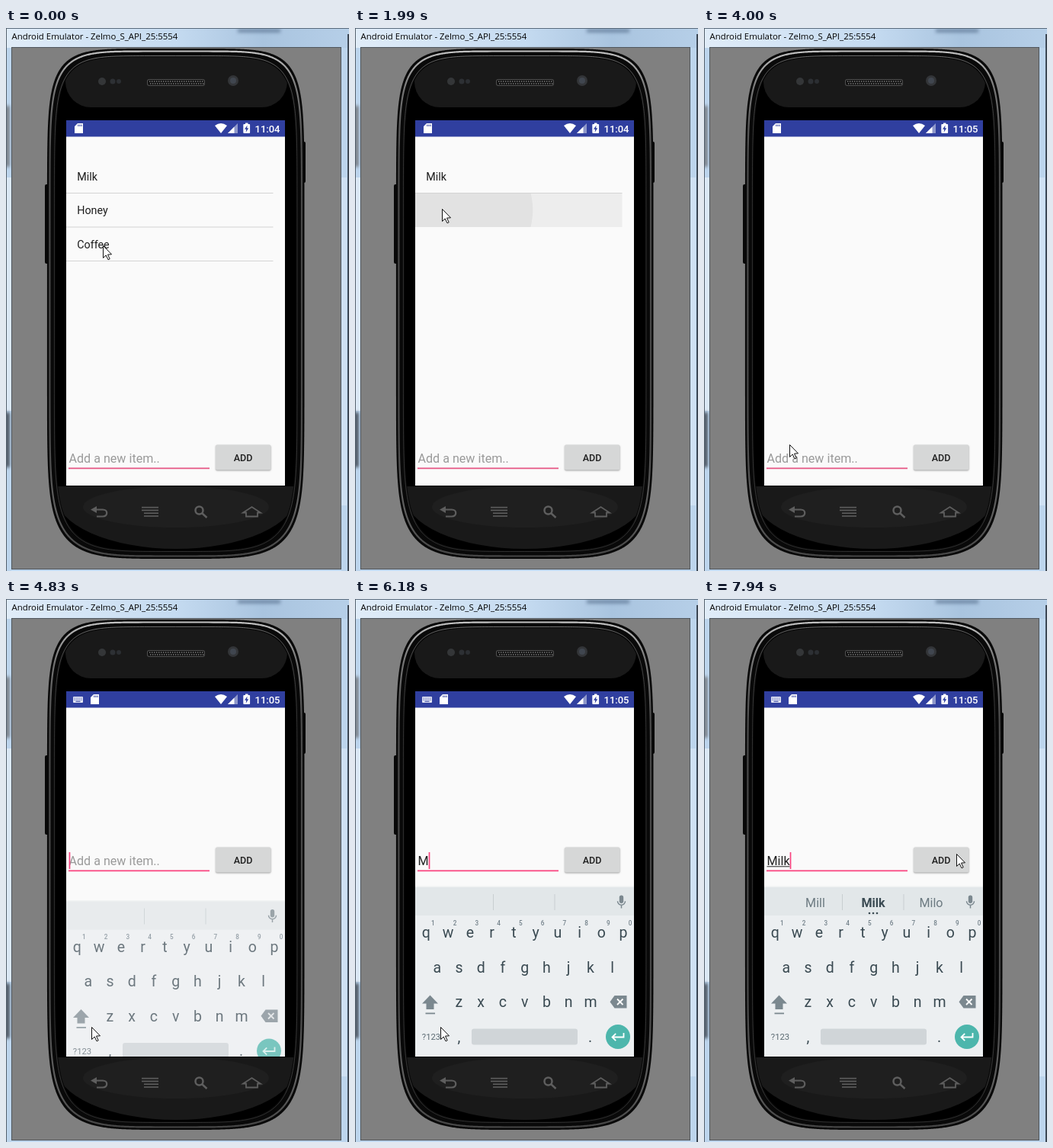
These frames come from a looping animation (450 px wide and 712 px high, 8000 ms). An HTML page with a canvas:

```html
<!DOCTYPE html>
<html lang="en">
<head>
<meta charset="utf-8">
<title>Shopping list</title>
<style>
html, body { margin: 0; width: 100%; height: 100%; overflow: hidden; background: #808080; }
canvas { display: block; width: 450px; height: 712px; }
</style>
</head>
<body>
<canvas id="stage"></canvas>
<script>
const W = 450, H = 712, LOOP = 8000;
const canvas = document.getElementById('stage');
const c = canvas.getContext('2d');
const ratio = window.devicePixelRatio || 1;
canvas.width = W * ratio;
canvas.height = H * ratio;

const ROBOTO = 'Roboto, "Noto Sans", sans-serif';
const TITLE = '"Open Sans", "Noto Sans", sans-serif';
const BLUE = '#303f9f', PINK = '#f9437f', METAL = '#5e5e5e';
const INK = '#3a4a52', SOFT = '#7b888f';

// Moments of the story, in ms
const OPEN = 4830, SETTLED = 4980, TYPE = 6180, KEY_GAP = 190, BLINK = 510;
const WORD = 'Milk';

// Mouse trips: when, where to, and an optional control point
const TRIPS = [
  { from: 120, to: 240, x: 127, y: 283 },
  { from: 1100, to: 1300, x: 114, y: 237 },
  { from: 2200, to: 2500, x: 111, y: 189 },
  { from: 3200, to: 4110, x: 112, y: 561 },
  { from: 7200, to: 7940, x: 331, y: 334, cx: 600, cy: 380 }
];

const clamp = (v, lo = 0, hi = 1) => Math.min(hi, Math.max(lo, v));
const smooth = p => p * p * (3 - 2 * p);
const bend = (a, b, d, p) => a * (1 - p) ** 2 + 2 * b * p * (1 - p) + d * p * p;

function mouseAt(t) {
  let x = 127, y = 285;
  for (const m of TRIPS) {
    const p = smooth(clamp((t - m.from) / (m.to - m.from)));
    const cx = m.cx ?? (x + m.x) / 2, cy = m.cy ?? (y + m.y) / 2;
    [x, y] = [bend(x, cx, m.x, p), bend(y, cy, m.y, p)];
  }
  return [x, y];
}
const typedCount = t => clamp(1 + Math.floor((t - TYPE) / KEY_GAP), 0, WORD.length);

function caretOn(t) {
  const n = typedCount(t);
  const since = n ? TYPE + (n - 1) * KEY_GAP : t < OPEN ? 120 - 2 * BLINK : 5660 - BLINK;
  return Math.floor(Math.max(0, t - since) / BLINK) % 2 === 0;
}

function box(x, y, w, h, fill, r = 0) {
  c.fillStyle = fill;
  c.beginPath();
  c.roundRect(x, y, w, h, r);
  c.fill();
}
function text(s, x, y, size, fill, weight = 400, align = 'center', family = ROBOTO) {
  c.font = `${weight} ${size}px ${family}`;
  c.textAlign = align;
  c.fillStyle = fill;
  c.fillText(s, x, y);
}
function shape(d, x, y, fill, stroke, width = 1) {
  c.save();
  c.translate(x, y);
  const path = new Path2D(d);
  if (fill) {
    c.fillStyle = fill;
    c.fill(path);
  }
  if (stroke) {
    c.strokeStyle = stroke;
    c.lineWidth = width;
    c.stroke(path);
  }
  c.restore();
}
function oval(x, y, rx, ry, fill) {
  c.fillStyle = fill;
  c.beginPath();
  c.ellipse(x, y, rx, ry, 0, 0, 7);
  c.fill();
}
const disc = (x, y, r, fill) => oval(x, y, r, r, fill);

function fade(x, y, ...colors) {
  const g = c.createLinearGradient(0, 0, x, y);
  colors.forEach((col, i) => g.addColorStop(i / (colors.length - 1), col));
  return g;
}

function drawWindow() {
  box(0, 0, W, H, '#bdd5ed');
  box(0, 0, W, 26, fade(W, 0, '#e0ecf8', '#d3e4f5', '#c4daf0', '#a9c4df', '#b6cfe8'));
  box(1, 196, 6, 306, '#dbe8f5');
  box(440, 196, 7, 430, '#cfe1f3');
  c.save();
  c.filter = 'blur(2px)';
  box(304, 1, 56, 5, 'rgba(60,85,115,.5)');
  box(0, 102, 4, 80, '#5f5d5f');
  box(0, 504, 4, 72, '#1d2026');
  c.restore();
  box(0, 0, W, 1, '#5c6c7d');
  box(0, 0, 1, H, '#56626e');
  box(448, 8, 2, H, '#3d4855');
  box(7, 25, 433, 685, '#4f565d');
  box(8, 26, 431, 683, '#808080');
  text('Android Emulator - Zelmo_S_API_25:5554', 7.5, 15, 11.4, '#000', 400, 'left', TITLE);
}

// Phone outline as a superellipse, rounder below, shrunk by d on every side
function body(d) {
  c.beginPath();
  for (let i = 0; i < 720; i++) {
    const a = i * Math.PI / 360, co = Math.cos(a), si = Math.sin(a);
    const [p, q] = si < 0 ? [6, 9] : [4.5, 8];
    c.lineTo(
      222.7 + Math.sign(co) * (168.8 - d) * Math.abs(co) ** (2 / p),
      361.5 + Math.sign(si) * (334.5 - d) * Math.abs(si) ** (2 / q)
    );
  }
  c.closePath();
}

function drawPhone() {
  box(51, 205, 6, 104, '#080808', 2);
  box(388, 149, 5, 54, '#080808', 2);
  body(0);
  c.fillStyle = '#090909';
  c.fill();
  c.strokeStyle = fade(0, H, '#eee', '#777', '#4c4c4c', '#484848', '#484848', '#484848', '#484848', '#4c4c4c', '#606060', '#3c3c3c');
  body(3.5);
  c.lineWidth = 2.2;
  c.stroke();
  body(9.5);
  c.lineWidth = 0.6;
  c.stroke();

  c.save();
  body(11);
  c.fillStyle = '#000';
  c.fill();
  c.clip();
  box(78, 37, 291, 67, '#191919', 34);
  oval(223, 612, 158, 71, '#191919');
  oval(223, 628, 122, 27, '#1f1f1f');
  box(66, 121, 314, 480, '#000');
  c.restore();

  disc(126, 70, 5, '#343638');
  disc(140, 70, 3.5, '#2d3034');
  disc(148, 70, 3, '#2b2e32');
  disc(298, 69, 7, '#333538');
  disc(298, 69, 4, '#40464f');
  box(185, 67, 76, 9, '#4f4f4f', 3);
  box(186, 68, 74, 7, '#121212', 2);
  for (let x = 188; x < 259; x += 3) {
    box(x, 69, 1.4, 2, '#626262');
    box(x + 1, 72, 1.4, 2, '#626262');
  }

  shape('M0 4.5L8 0V9Z', 111, 627, METAL);
  shape('M0 0H12C19 0 19 9 12 9H4', 115, 631.5, null, METAL, 2.2);
  for (let i = 0; i < 4; i++) box(i > 1 ? 181 : 178, 627.8 + i * 3.8, i > 1 ? 19 : 22, 1.6, METAL);
  shape('M5 0A5 5 0 1 1 -5 0A5 5 0 1 1 5 0M3.5 3.5L10 9.5', 253.5, 632.5, null, METAL, 2.5);
  shape('M0 7.5L11.5 0L23 7.5H19V12.5H4V7.5Z', 311, 628, null, METAL, 1.8);
}

function drawStatus(t) {
  box(79, 121, 287, 21.5, BLUE);
  const open = t >= OPEN, x = open ? 111 : 90;
  if (open) {
    box(88, 128, 13, 8, '#e4e7f5', 1);
    for (let i = 0; i < 10; i++) box(89.3 + (i % 5) * 2.3, i < 5 ? 129.5 : 131.7, 1.1, 1.1, BLUE);
    box(91.5, 133.8, 6, 1, BLUE);
  }
  shape('M4 0H11V13H0V4Z', x, 125, '#fff');
  for (let i = 0; i < 3; i++) box(x + 4.3 + i * 2.1, 126.5, 1, 2.6, BLUE);
  shape('M0 13L-8 3Q0 -3 8 3Z', 282, 125, '#fff');
  shape('M0 13L13 0V13Z', 291, 125, '#8f98cb');
  shape('M0 13L8.5 4.5V13Z', 291, 125, '#fff');
  box(314, 124.5, 3.5, 3, '#fff');
  box(311.3, 126, 8.8, 12, '#fff', 1);
  shape('M3.6 0L0 5.3H2.2L1.7 9.2L5.3 3.7H3.1Z', 313, 127.5, BLUE);
  text(t < 2230 ? '11:04' : '11:05', 326.5, 136.8, 13, '#fff', 500, 'left');
}

// Pressed row: a flat tint with a growing circle
function press(y, tint, x, r, fill) {
  c.save();
  c.beginPath();
  c.rect(79, y, 271.5, 44);
  c.clip();
  box(79, y, 272, 44, tint);
  disc(x, y + 21.5, r, fill);
  c.restore();
}

function drawList(t) {
  if (t >= 640 && t < 1990) {
    const r = t < 1180 ? clamp((t - 545) / 245) * 47 : 0;
    press(261.5, '#e9e9e9', 140.5, r, '#dcdcdc');
  }
  if (t >= 1990 && t < 2230) {
    c.globalAlpha = clamp((2350 - t) / 240);
    press(217, '#ededed', 145, 88 + (t - 1990) * 0.3, '#e2e2e2');
    c.globalAlpha = 1;
  }
  const items = [['Milk', 2900], ['Honey', 1990], ['Coffee', 790]];
  items.forEach(([name, gone], i) => {
    if (t >= gone) return;
    if (i < 2 || t < 640) box(79, 216 + i * 44.5, 271.5, 1, '#d4d4d4');
    text(name, 93.2, 200 + i * 44.4, 14.3, '#1c1c1c', 400, 'left');
  });
}

function drawInput(t) {
  const dy = t >= OPEN ? -221 : 0;
  const typed = WORD.slice(0, typedCount(t));
  text(typed || 'Add a new item..', 82.5, 570 + dy, 16.13, typed ? '#202020' : '#9a9a9a', 400, 'left');
  const width = typed ? c.measureText(typed).width : 0;
  if (typed.length > 1) box(82.5, 571.3 + dy, width, 1, '#202020');
  box(82, 576.6 + dy, 185, 1.7, dy ? PINK : '#e65583');
  if (caretOn(t)) box(82.6 + width, 553 + dy, 1.7, 22, PINK);

  c.save();
  c.shadowColor = 'rgba(0,0,0,.35)';
  c.shadowBlur = 2 * ratio;
  c.shadowOffsetY = ratio;
  box(275, 546.5 + dy, 72.5, 33, '#d6d7d7', 2);
  c.restore();
  text('ADD', 311, 567.7 + dy, 12.55, '#212121', 500);
}

function drawKeys(t) {
  box(79, 376.5, 287, 2, '#eff1f2');
  box(79, 378, 287, 37.5, '#e2e7e9');
  box(79, 415, 287, 210, '#eceff1');
  [181, 261.5].forEach(x => box(x, 387, 1, 21, '#c8ced1'));
  box(346.8, 388.5, 5.4, 10.5, SOFT, 2.7);
  shape('M-5 0A5 5 0 0 0 5 0M0 5V9.3', 349.5, 396.2, null, SOFT, 1.5);

  if (typedCount(t) > 2) {
    ['Mill', 'Milk', 'Milo'].forEach((s, i) => {
      const best = s === WORD;
      text(s, 146 + i * 76, 404, 16.1, best ? INK : '#6c7a81', best ? 700 : 400);
      disc(217 + i * 5, 412, 1.3, INK);
    });
  }
  ['qwertyuiop', 'asdfghjkl', 'zxcvbnm'].forEach((keys, row) => {
    const left = 222.7 - (keys.length - 1) * 14.375;
    [...keys].forEach((k, i) => {
      const x = left + i * 28.75;
      text(k, x, 444 + row * 45.7, 19.5, INK);
      if (!row) text((i + 1) % 10, x + 9, 427.5, 8.2, '#73818a', 500);
    });
  });
  shape('M0 0L10.5 11H5V18.5H-5V11H-10.5Z', 98.5, 519.5, SOFT);
  box(92.5, 542.5, 12.5, 1.8, SOFT);
  shape('M0 8.2L6 0H22V16.5H6Z', 334.5, 520, SOFT);
  shape('M0 0L7.5 7.5M7.5 0L0 7.5', 344, 524.5, null, '#fff', 1.8);
  text('?123', 100, 578, 11.3, '#5b6a72');
  text(',', 136.5, 580.5, 19.5, INK);
  text('.', 308.5, 580.5, 19.5, INK);
  box(153, 563.5, 139, 21, '#d0d5d8', 3);
  disc(345, 574, 16, '#4db6ac');
  shape('M15 -5.5V0H0M4.7 -4.7L0 0L4.7 4.7', 337.5, 574.5, null, '#fff', 1.8);
}

function draw(t) {
  c.setTransform(ratio, 0, 0, ratio, 0, 0);
  drawWindow();
  drawPhone();
  c.save();
  c.beginPath();
  c.rect(79, 121, 287, 479);
  c.clip();
  box(79, 121, 287, 479, '#fafafa');
  drawStatus(t);
  drawList(t);
  drawInput(t);
  if (t >= OPEN) {
    if (t < SETTLED) {
      c.globalAlpha = 0.72;
      c.translate(0, 18.5);
    }
    drawKeys(t);
  }
  c.restore();
  const [x, y] = mouseAt(t);
  shape('M0 0V16L3.7 12.5L6.5 18.3L8.7 17.3L6 11.6L11 11.3Z', Math.round(x) + 0.5, Math.round(y) + 0.5, '#fff', '#111');
}

const start = performance.now();
function frame() {
  draw((performance.now() - start) % LOOP);
  requestAnimationFrame(frame);
}
frame();
</script>
</body>
</html>
```
